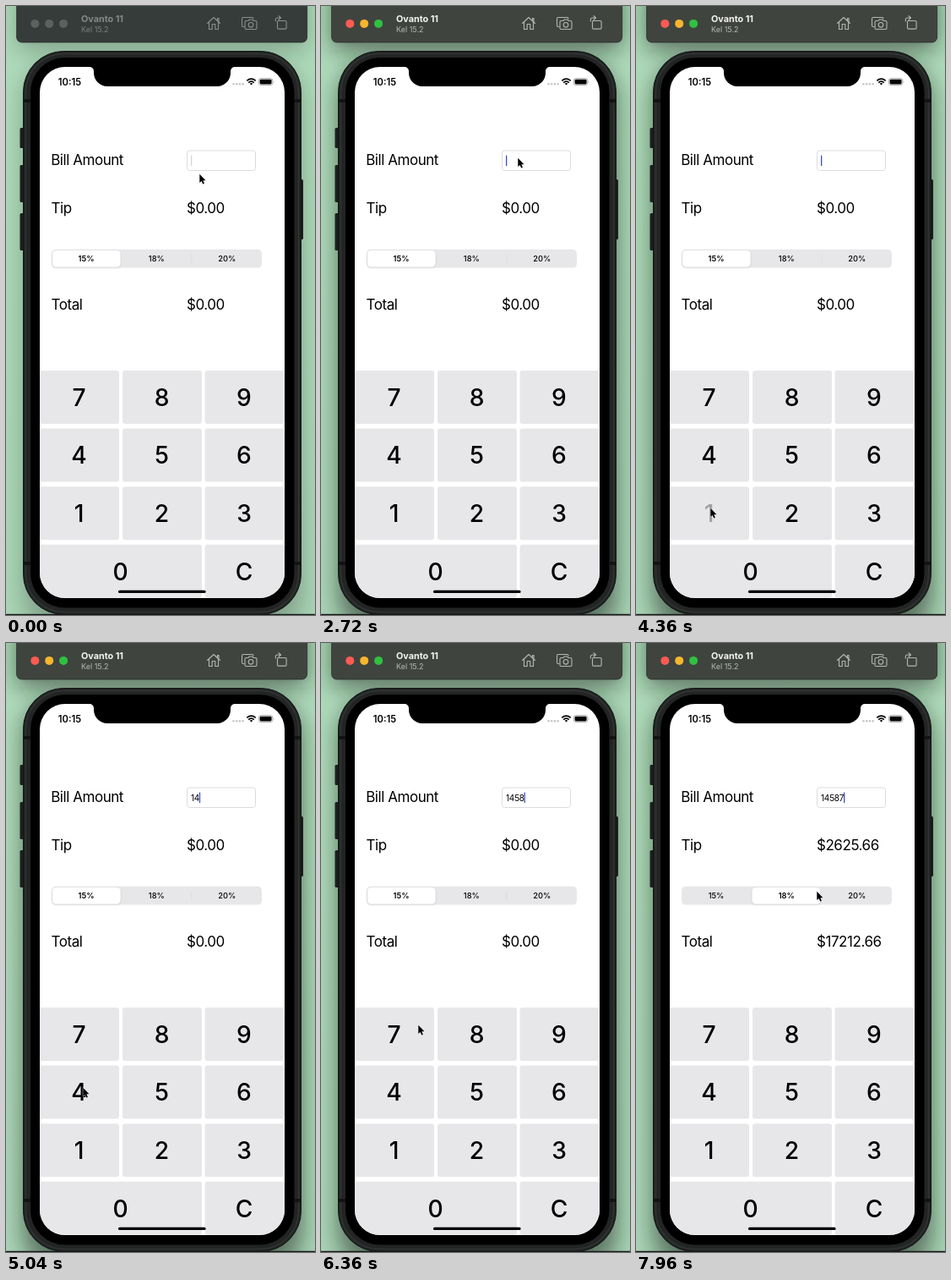
An HTML page for the animation above (8000 ms loop, 366 by 720 pixels).

```html
<!DOCTYPE html>
<html lang="en">
<head>
<meta charset="utf-8">
<title>Tip calculator</title>
<style>
  html, body { margin: 0; width: 100%; height: 100%; overflow: hidden; background: #abd5b7; }
  svg { display: block; width: 100vw; height: 100vh; }
  text { font-family: Inter, Roboto, sans-serif; }
  .label { font-size: 17px; letter-spacing: -.45px; }
  .segment { font-size: 9.3px; font-weight: 500; text-anchor: middle; }
  .segment.on { font-weight: 600; }
  .key { font-size: 28.2px; font-weight: 500; text-anchor: middle; }
  .icon { fill: none; stroke: #8b908d; stroke-width: 1.1; stroke-linejoin: round; stroke-linecap: round; }
  #shade { opacity: .26; }
  #bar { fill: #363c39; }
  #device { fill: #858987; font-size: 10.8px; font-weight: 700; }
  #system { fill: #7d827f; font-size: 9px; }
  .light { fill: #5c615e; }
  .active #shade { opacity: .5; }
  .active #bar { fill: #40443f; }
  .active #device { fill: #f4f5f4; }
  .active #system { fill: #b6b9b7; }
  .active .icon { stroke: #b3b7b4; }
  .active .red { fill: #fc5b52; }
  .active .amber { fill: #f8b62d; }
  .active .green { fill: #30c141; }
  #caret { fill: #8d8d92; }
  .active #caret { fill: #3d4fc4; }
</style>
</head>
<body>
<svg id="stage" viewBox="0 0 366 720" preserveAspectRatio="none">
  <defs>
    <filter id="soft" x="-30%" y="-30%" width="160%" height="160%"><feGaussianBlur stdDeviation="13"/></filter>
    <filter id="lift" x="-10%" y="-20%" width="120%" height="150%"><feDropShadow dx="0" dy=".8" stdDeviation="1" flood-opacity=".16"/></filter>
    <linearGradient id="wall" x2="0" y2="1">
      <stop stop-color="#aedaba"/><stop offset="1" stop-color="#abd5b7"/>
    </linearGradient>
    <clipPath id="screen"><rect x="40" y="72" width="290" height="628" rx="30"/></clipPath>
  </defs>

  <rect width="366" height="720" fill="url(#wall)"/>
  <g id="shade" filter="url(#soft)" fill="#08130d">
    <rect x="12" y="-20" width="345" height="72" rx="8"/>
    <rect x="20" y="64" width="331" height="680" rx="48"/>
  </g>

  <rect id="bar" x="12.6" y="-10" width="344" height="53" rx="6" stroke="#202522" stroke-width=".7"/>
  <circle class="light red" cx="34.3" cy="20.9" r="5"/>
  <circle class="light amber" cx="51.2" cy="20.9" r="5"/>
  <circle class="light green" cx="68.1" cy="20.9" r="5"/>
  <text id="device" x="89" y="19.3">Ovanto 11</text>
  <text id="system" x="89" y="31">Kel 15.2</text>
  <g class="icon">
    <path d="M238.5 20.5 246 13.5 253.5 20.5M240.5 19V27.5H244.2V21.5H247.8V27.5H251.5V19M250.5 17.5V14.5H252V18.5"/>
    <path d="M282 24.5H280.8Q279.5 24.5 279.5 23V15.2Q279.5 13.5 281 13.5H291.5Q293 13.5 293 15"/>
    <path d="M284.5 17.5H287L288 16H292L293 17.5H295.5Q297 17.5 297 19V26Q297 27.5 295.5 27.5H284.5Q283 27.5 283 26V19Q283 17.5 284.5 17.5Z"/>
    <circle cx="290" cy="22.3" r="2.8"/>
    <rect x="321.5" y="17.5" width="10.6" height="9.6" rx="1.2"/>
    <path d="M319.3 18V16Q319.3 14 321.5 14H325M323 11.7 325.5 14 323 16.3"/>
  </g>

  <g fill="#1c1f1e">
    <rect x="16.5" y="144" width="6" height="24" rx="1.5"/>
    <rect x="16.5" y="188" width="6" height="44" rx="1.5"/>
    <rect x="16.5" y="245" width="6" height="44" rx="1.5"/>
    <rect x="347" y="205" width="5" height="71" rx="1.5"/>
  </g>
  <rect x="20.5" y="53.5" width="329" height="666" rx="48" fill="#222524" stroke="#111312"/>
  <rect x="23.5" y="56.5" width="323" height="660" rx="45" fill="none" stroke="#303433" stroke-width="1.4"/>
  <rect x="29" y="61" width="312.5" height="650.5" rx="41"/>
  <g fill="#121413">
    <rect x="21" y="110" width="8" height="4"/><rect x="341.5" y="110" width="8" height="4"/>
    <rect x="21" y="657" width="8" height="4"/><rect x="341.5" y="657" width="8" height="4"/>
  </g>
  <rect y="718.8" width="366" height="1.2" fill="#151817"/>

  <g clip-path="url(#screen)">
    <rect x="40" y="72" width="290" height="628" fill="#fff"/>
    <path d="M99 71V72A5 5 0 0 1 104 77V79A16 16 0 0 0 120 95H250A16 16 0 0 0 266 79V77A5 5 0 0 1 271 72V71Z"/>
    <text x="61.8" y="93.5" font-size="11.2" font-weight="600">10:15</text>
    <g fill="#c3c3c5">
      <circle cx="269.5" cy="92.3" r="1.2"/><circle cx="273.2" cy="92.3" r="1.2"/>
      <circle cx="276.9" cy="92.3" r="1.2"/><circle cx="280.6" cy="92.3" r="1.2"/>
    </g>
    <g fill="none" stroke="#000" stroke-width="1.7">
      <path d="M285.3 88.4Q290.5 83.9 295.7 88.4M287.2 90.6Q290.5 87.8 293.8 90.6"/>
      <path d="M288.7 91.7Q290.5 90.3 292.3 91.7L290.5 93.6Z" fill="#000" stroke="none"/>
    </g>
    <rect x="299.4" y="85.6" width="16.4" height="8" rx="2.4" fill="none" stroke="#9a9a9a" stroke-width=".8"/>
    <rect x="300.6" y="86.8" width="14" height="5.6" rx="1.3"/>
    <path d="M316.8 88.2Q318.2 89.6 316.8 91Z" fill="#9a9a9a"/>

    <g class="label">
      <text x="53.2" y="188">Bill Amount</text>
      <text x="53.6" y="245">Tip</text>
      <text x="53.6" y="359">Total</text>
      <text id="tip" x="214" y="245"></text>
      <text id="total" x="214" y="359"></text>
    </g>
    <rect x="214.5" y="171" width="81" height="23.5" rx="3" fill="#fff" stroke="#d9d9db" stroke-width=".9"/>
    <text id="bill" x="219" y="186.5" font-size="10" letter-spacing="-.2"></text>
    <rect id="caret" y="176.5" width="1.3" height="12.5" rx=".5"/>

    <rect x="54" y="287.8" width="249" height="21.8" rx="5" fill="#e7e7e9"/>
    <rect id="split" x="219.6" y="293" width=".7" height="11" fill="#dadadd"/>
    <rect id="thumb" x="55" y="289" width="80.5" height="19.4" rx="4.3" fill="#fff" filter="url(#lift)"/>
    <text class="segment" x="95" y="302">15%</text>
    <text class="segment" x="178.3" y="302">18%</text>
    <text class="segment" x="261.7" y="302">20%</text>

    <g id="keys"></g>
    <rect x="133" y="690.8" width="103.6" height="3.2" rx="1.6"/>
  </g>

  <path id="pointer" d="M.3 .8V11L2.6 8.9 4.2 12.6 5.9 11.9 4.4 8.3H7.5Z" stroke="#fff" stroke-width=".9" stroke-linejoin="round" paint-order="stroke"/>
</svg>
<script>
const LOOP = 8000, ACTIVATE = 2520, PICK = 7640;
const $ = id => document.getElementById(id);
const clamp = v => Math.max(0, Math.min(1, v));
const ease = p => p * p * (3 - 2 * p);

// time, x, y
const PATH = [
  [0, 229, 198], [2200, 229, 198], [2480, 233, 179], [3060, 233, 179],
  [3360, 84, 605], [3540, 84, 605], [3760, 83, 520], [4080, 88, 593],
  [4500, 88, 593], [4740, 91, 525], [5060, 91, 525], [5200, 180, 525],
  [5480, 180, 523], [5610, 180, 523], [5760, 180, 441], [6120, 180, 441],
  [6360, 115, 451], [6440, 108, 449], [6780, 108, 449], [7580, 214, 293], [LOOP, 214, 293]
];

const PRESSES = [
  { digit: '1', down: 4280, up: 4400 },
  { digit: '4', down: 4760, up: 4840 },
  { digit: '5', down: 5220, up: 5300 },
  { digit: '8', down: 5940, up: 6040 },
  { digit: '7', down: 6400, up: 6480 }
];

const glyphs = {};
function addKey(label, x, y, width, center) {
  $('keys').insertAdjacentHTML('beforeend',
    `<rect x="${x}" y="${y}" width="${width}" height="63" rx="3.2" fill="#e7e7e9"/>
     <text class="key" x="${center}" y="${y + 41.8}">${label}</text>`);
  glyphs[label] = $('keys').lastElementChild;
}
const COLUMNS = [[40, 86.5], [138, 184.5], [235.5, 282]];
['789', '456', '123'].forEach((row, r) =>
  [...row].forEach((label, c) => addKey(label, COLUMNS[c][0], 431 + r * 68.6, 94, COLUMNS[c][1])));
addKey('0', 40, 636.8, 192, 135.5);
addKey('C', 235.5, 636.8, 94.5, 282);

const segments = [...document.querySelectorAll('.segment')];

function pointerAt(t) {
  const i = PATH.findIndex(stop => stop[0] > t);
  const [t0, x0, y0] = PATH[i - 1], [t1, x1, y1] = PATH[i];
  const p = ease((t - t0) / (t1 - t0));
  return [x0 + (x1 - x0) * p, y0 + (y1 - y0) * p];
}

// Solid, fade out, short pause, fade in
function blink(elapsed) {
  const s = elapsed % 960;
  return s < 840 ? 1 - clamp((s - 540) / 160) : (s - 840) / 120;
}

function render(t) {
  $('stage').classList.toggle('active', t >= ACTIVATE);
  $('pointer').setAttribute('transform', `translate(${pointerAt(t)})`);

  const typed = PRESSES.filter(press => t >= press.up);
  const bill = typed.map(press => press.digit).join('');
  $('bill').textContent = bill;
  $('caret').setAttribute('x', 219 + (bill ? $('bill').getComputedTextLength() - .3 : 0));
  $('caret').style.opacity = blink(t - (typed.length ? typed[typed.length - 1].up : -640));

  for (const { digit, down, up } of PRESSES)
    glyphs[digit].style.opacity = t < down ? 1 : .3 + .7 * clamp((t - up) / 160);

  const picked = t >= PICK;
  const tip = picked ? bill * .18 : 0;
  $('tip').textContent = '$' + tip.toFixed(2);
  $('total').textContent = '$' + (picked ? +bill + tip : 0).toFixed(2);
  $('thumb').setAttribute('x', 55 + 82.6 * ease(clamp((t - PICK) / 300)));
  segments.forEach((label, i) => label.classList.toggle('on', i === +picked));
  $('split').style.opacity = picked ? 0 : 1;
}

const start = performance.now();
function frame() {
  render((performance.now() - start) % LOOP);
  requestAnimationFrame(frame);
}
frame();
</script>
</body>
</html>
```
